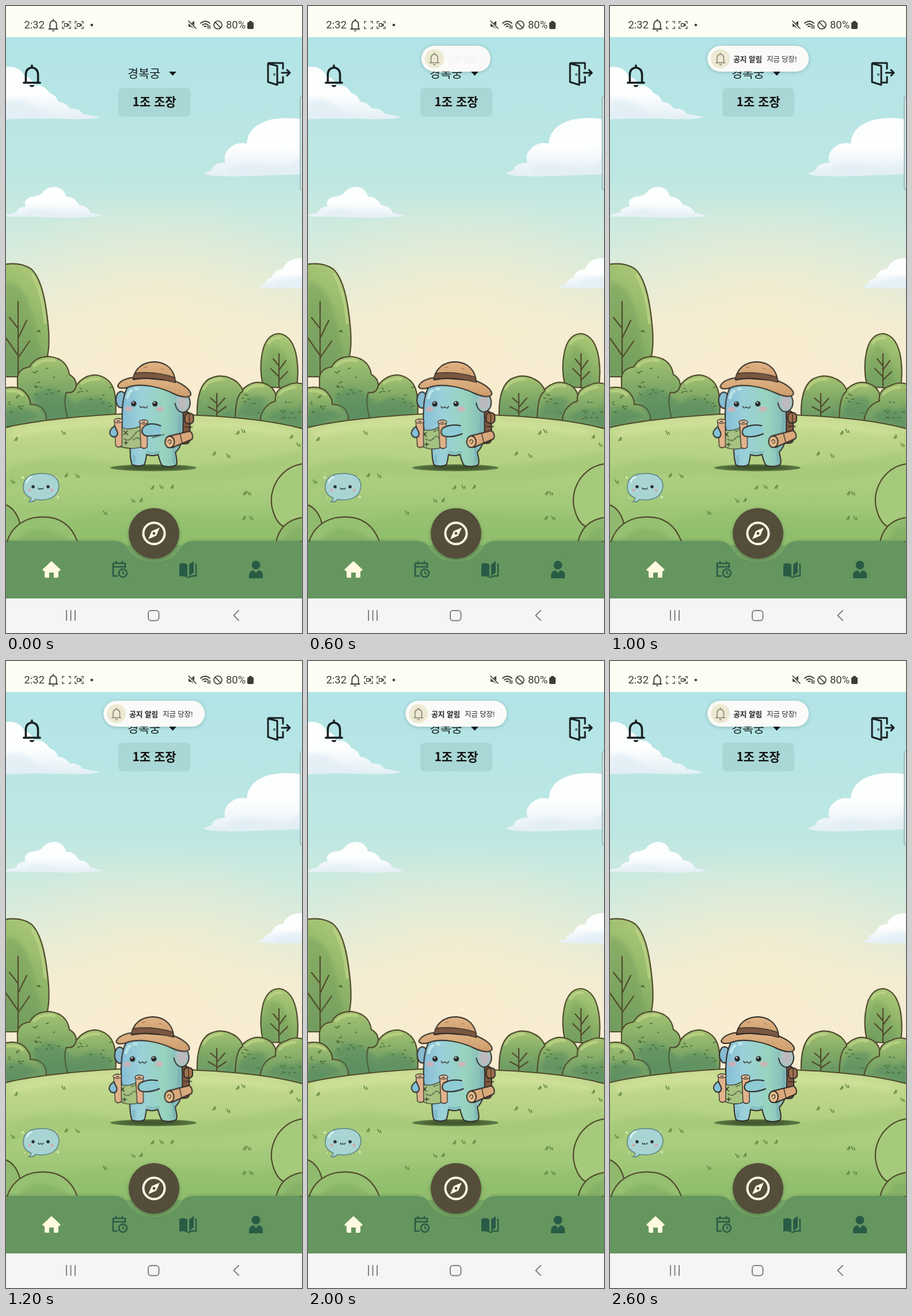
An HTML page for the animation above (2700 ms loop, 514 by 1089 pixels).

```html
<!DOCTYPE html>
<html lang="ko">
<head>
<meta charset="utf-8">
<title>Home</title>
<style>
html, body { margin: 0; width: 100%; height: 100%; overflow: hidden; background: #fdfdf3; }
#stage { position: absolute; left: 0; top: 0; width: 514px; height: 1089px; overflow: hidden; }
svg { display: block; }
text, .toast { font-family: "Noto Sans CJK KR", "Noto Sans CJK", "Noto Sans", sans-serif; }
.status text { font: 18.4px Roboto, sans-serif; fill: #3e3e39; }
.ink, .hero, .line { stroke-linecap: round; stroke-linejoin: round; }
.ink { stroke: #514b2d; stroke-width: 2.2; }
.hero { stroke: #2f2b27; stroke-width: 2; }
.line { fill: none; }
.thin { stroke-width: 1.3; }

.sway, .grip, .wide, .narrow, .blink, .toast, .toast span { animation: 2.7s linear infinite; }
.sway { animation-name: sway; transform-origin: 256px 798px; }
.grip { animation-name: grip; }
.wide { animation-name: wide; animation-timing-function: step-end; }
.narrow { animation-name: narrow; animation-timing-function: step-end; }
.blink { animation-name: blink; animation-timing-function: step-end; }
@keyframes sway {
  0% { transform: rotate(.4deg); }
  11.1% { transform: rotate(0deg); }
  29.6%, 59.2% { transform: rotate(-.7deg); }
  74% { transform: rotate(-.2deg); }
  96.3%, 100% { transform: rotate(0deg); }
}
@keyframes grip {
  0%, 11.1%, 74%, 100% { transform: translateX(0); }
  29.6%, 59.2% { transform: translateX(-3px); }
}
@keyframes wide { 0% { opacity: 1; } 3.7%, 100% { opacity: 0; } }
@keyframes narrow { 0% { opacity: 0; } 3.7%, 100% { opacity: 1; } }
@keyframes blink { 0% { opacity: 1; } 21.5% { opacity: 0; } 69% { opacity: 1; } 91% { opacity: 0; } }

.toast {
  position: absolute; left: 257px; top: 69px; height: 45px; width: 45px; border-radius: 23px;
  overflow: hidden; white-space: nowrap; background: #fafbf8; color: #1c1c1c;
  box-shadow: 0 1px 6px rgba(40, 70, 70, .28); font-size: 12.3px; font-weight: 500; line-height: 45px;
  animation-name: toast;
}
.toast svg { position: absolute; left: 6px; top: 6px; }
.toast span { position: absolute; left: 45px; top: 0; animation-name: words; }
.toast b { font-weight: 700; font-size: 12.6px; margin-right: 8px; }
@keyframes toast {
  0%, 7.4% { opacity: 0; width: 45px; transform: translate(-50%, -18px) scale(.8); }
  11.1% { opacity: .16; width: 45px; transform: translate(-50%, -11.5px) scale(.88); }
  18.5% { opacity: 1; width: 45px; transform: translate(-50%, 0); animation-timing-function: ease-out; }
  27.8%, 100% { opacity: 1; width: 175.5px; transform: translate(-50%, 0); }
}
@keyframes words { 0%, 22% { opacity: 0; } 30% { opacity: .85; } 40%, 100% { opacity: 1; } }
</style>
</head>
<body>
<div id="stage">
<svg width="514" height="1089" viewBox="0 0 514 1089">
<defs>
  <linearGradient id="sky" x2="0" y2="1">
    <stop stop-color="#b2e4e7"/><stop offset=".35" stop-color="#bde7e3"/><stop offset=".55" stop-color="#d7ebdc"/>
    <stop offset=".74" stop-color="#f3ecd3"/><stop offset="1" stop-color="#faecd1"/>
  </linearGradient>
  <radialGradient id="glow"><stop stop-color="#fdeecb" stop-opacity=".6"/><stop offset="1" stop-color="#fdeecb" stop-opacity="0"/></radialGradient>
  <linearGradient id="cloud" x2="0" y2="1"><stop offset=".5" stop-color="#fdfefe"/><stop offset="1" stop-color="#e3eff5"/></linearGradient>
  <linearGradient id="grass" x2="0" y2="1">
    <stop stop-color="#cbdd94"/><stop offset=".25" stop-color="#b9d486"/><stop offset=".65" stop-color="#a4c97a"/><stop offset="1" stop-color="#90bf6e"/>
  </linearGradient>
  <linearGradient id="bush" x2="0" y2="1"><stop stop-color="#a5c373"/><stop offset=".4" stop-color="#83ab67"/><stop offset="1" stop-color="#5f9263"/></linearGradient>
  <linearGradient id="tree" x1=".6" x2=".3" y2="1"><stop stop-color="#aac877"/><stop offset=".5" stop-color="#8fb468"/><stop offset="1" stop-color="#729f61"/></linearGradient>
  <linearGradient id="skin"><stop stop-color="#85bdd6"/><stop offset=".3" stop-color="#9bd0d9"/><stop offset=".7" stop-color="#98d3be"/><stop offset="1" stop-color="#82b8b8"/></linearGradient>
  <linearGradient id="straw" x2="0" y2="1"><stop stop-color="#dfb384"/><stop offset="1" stop-color="#cd9c6c"/></linearGradient>
  <radialGradient id="shade"><stop offset=".45" stop-color="#43582f"/><stop offset="1" stop-color="#5f7b45"/></radialGradient>
  <filter id="soft" x="-30%" y="-30%" width="160%" height="160%"><feGaussianBlur stdDeviation="3"/></filter>
  <g id="bell">
    <path d="M-9 10V-1C-9 -7-6-11 0-12 6-11 9-7 9-1V10M-12 11H12M0-12V-15" class="line"/>
    <path d="M-3.5 14.5A3.5 3 0 0 0 3.5 14.5Z" stroke="none"/>
  </g>
  <path id="corners" class="line" stroke="#44443f" stroke-width="1.4" d="M-7-3V-6H-4M4-6H7V-3M7 3V6H4M-4 6H-7V3"/>
  <path id="cam" class="line" stroke="#44443f" stroke-width="1.3" d="M-3.5-2.5H1.5V2.5H-3.5ZM1.5 0 4-2V2Z"/>
  <g id="scroll" class="hero thin">
    <path d="M-6-22 7-23 7 21Q1 26-4 21Z" fill="#e1b28c"/>
    <ellipse cx=".5" cy="-22.5" rx="7.5" ry="3.5" fill="#f0c9a3"/><path d="M-2-22H3"/>
  </g>
</defs>

<path fill="#fdfdf3" d="M0 0H514V54H0Z"/>
<path fill="url(#sky)" d="M0 54H514V740H0Z"/>
<ellipse cx="262" cy="520" rx="300" ry="200" fill="url(#glow)"/>

<g fill="url(#cloud)">
  <path d="M0 106Q22 103 32 121 46 126 49 138 67 136 75 151 88 155 90 166 103 167 111 178 127 177 133 187L163 193Q150 198 92 196T0 197Z"/>
  <path d="M514 197Q489 192 461 197 420 207 418 239 400 235 388 247 376 257 381 272 359 273 357 285L343 291Q358 298 430 295L514 292Z"/>
  <path d="M0 363 18 358Q20 350 34 348 29 336 45 331 54 331 62 326 70 314 86 314 101 317 104 331 119 331 127 346 142 347 147 359L168 364Q150 369 80 367T0 366Z"/>
  <path d="M514 438Q489 437 481 457 465 458 461 472 451 473 448 483L436 487Q450 492 514 490Z"/>
</g>
<g fill="#dfecf4" opacity=".6" filter="url(#soft)">
  <path d="M0 164Q25 155 48 173T110 191L0 194ZM385 283Q410 265 450 277T514 260V290L390 292ZM28 362Q55 346 80 358T135 362L90 365ZM463 485Q480 470 514 470V488Z"/>
</g>

<!-- left woods -->
<path class="ink" fill="url(#tree)" d="M-4 449Q26 444 44 457C62 474 69 513 73 552Q77 590 71 612L22 644H-4Z"/>
<path fill="#6f9a5a" opacity=".4" filter="url(#soft)" d="M0 480Q29 479 43 526T60 613L22 640H0Z"/>
<path class="ink line" d="M21 513V641M21 560 6 541M21 577 36 546M21 607 0 577M21 611 41 582"/>
<path class="ink" fill="url(#bush)" d="M20 652Q18 630 41 627 51 608 77 609 106 613 110 640 121 646 122 657L125 730H20Z"/>
<path class="ink" fill="url(#bush)" d="M112 730Q97 690 105 671 119 674 122 659 136 640 158 641 182 646 188 669 193 688 189 730Z"/>
<path class="ink" fill="url(#bush)" d="M-4 664Q25 657 37 676 43 684 42 692 66 692 70 713V740H-4Z"/>
<path fill="#477f5d" opacity=".38" filter="url(#soft)" d="M45 680Q70 652 96 671T122 690Q150 668 183 691L184 708 70 718ZM0 700Q25 690 60 712L0 733Z"/>
<path class="line" stroke="#bfd688" stroke-width="5" opacity=".7" d="M49 625Q63 612 84 616M132 655Q145 646 162 648M3 669Q20 667 29 675M46 467Q64 499 68 550"/>

<!-- right woods -->
<path class="ink" fill="url(#tree)" d="M447 661Q438 628 447 594 455 569 475 569 499 573 505 612 509 640 504 665Z"/>
<path fill="#6f9a5a" opacity=".35" filter="url(#soft)" d="M453 656Q446 610 463 590 490 591 494 659Z"/>
<path class="ink line" d="M474 604V662M474 625 464 613M474 632 486 616M474 644 460 630M474 650 489 635"/>
<path class="ink" fill="url(#bush)" d="M398 730Q394 678 414 663 435 646 458 660 469 668 470 684V730Z"/>
<path class="ink" fill="url(#bush)" d="M333 730Q327 665 352 648 377 635 401 653 413 665 410 670 397 678 398 730Z"/>
<path class="ink line" d="M366 673V713M366 690 355 681M366 697 380 681M366 704 351 696M366 707 382 696"/>
<path class="ink" fill="url(#bush)" d="M441 735Q438 696 468 686 465 666 488 659 504 651 518 658V745Z"/>
<path fill="#477f5d" opacity=".35" filter="url(#soft)" d="M405 710Q407 680 435 678T441 713ZM455 716Q468 696 488 700T514 690V729ZM375 711Q400 700 399 678L390 711Z"/>
<path class="line" stroke="#bfd688" stroke-width="5" opacity=".7" d="M343 665Q352 648 375 648M417 668Q431 656 446 660M475 674Q484 664 502 662M456 586Q463 575 477 576"/>
<g id="leaves" class="line" stroke="#4b6b36" stroke-width="1.5"></g>

<!-- meadow -->
<path class="ink" fill="url(#grass)" d="M-4 733Q60 717 190 709 260 705 335 711 450 716 518 735V940H-4Z"/>
<g fill="#83b760" opacity=".2" filter="url(#soft)">
  <path d="M0 803Q90 767 205 798L309 801Q430 793 514 770V803Q380 835 235 819T0 837ZM80 900Q180 858 310 877T514 870V928H90Z"/>
</g>
<path fill="#dbe6a4" opacity=".4" filter="url(#soft)" d="M10 736Q100 717 190 717V730Q90 734 10 751ZM325 720Q420 720 500 740L480 747Q400 734 325 736Z"/>
<g id="tufts" class="line" stroke="#587c3b" stroke-width="1.5"></g>
<path class="ink" fill="#a6ca7b" d="M518 795Q490 797 472 822 453 852 466 884 474 904 490 907L518 900Z"/>
<path class="ink" fill="#90ba6d" d="M469 930Q478 892 518 888V930ZM-4 865Q19 872 25 903L20 930H-4Z"/>
<path class="ink" fill="#96c072" d="M2 930Q12 898 47 889 105 879 124 930Z"/>
<path fill="#70a259" opacity=".35" filter="url(#soft)" d="M20 929Q40 903 70 909T108 929ZM484 928Q492 905 514 905V928Z"/>

<!-- traveller -->
<ellipse cx="256" cy="802" rx="75" ry="6" fill="url(#shade)"/>
<g class="sway">
  <g class="hero">
    <rect x="299" y="704" width="20" height="56" rx="7" fill="#80573f"/>
    <rect x="310" y="707" width="15" height="18" rx="6" fill="#a06f4d"/>
    <path class="thin" d="M318 708V724M310 731H323"/>
    <ellipse cx="199" cy="684" rx="9" ry="14" fill="#86bbd0"/>
    <path fill="url(#skin)" d="M215 768C203 750 200 735 201 715 201 690 203 668 218 650H292C306 668 308 700 307 735 307 755 302 768 294 775 296 785 299 795 294 798Q282 802 271 798C267 792 266 786 264 779Q254 783 244 779C243 787 242 793 240 797Q230 801 219 797C215 788 216 778 215 768Z"/>
    <path fill="#a3c4c4" d="M297 676Q306 668 315 676 322 687 317 698 310 709 301 704 294 699 293 690"/>
  </g>
  <ellipse cx="307" cy="689" rx="8" ry="12" fill="#c6b6bc" opacity=".7"/>
  <path class="line" stroke="#6ba2ae" stroke-width="5" opacity=".4" d="M302 712Q303 745 291 767L292 792M222 782V792M246 775Q255 779 265 775"/>
  <path class="line" stroke="#c6ebea" stroke-width="5" opacity=".8" d="M210 680Q212 671 217 668M224 665H228"/>
  <g fill="#d8adb2" opacity=".75"><ellipse cx="212" cy="700" rx="7" ry="4.5"/><ellipse cx="267" cy="700" rx="7" ry="4.5"/></g>
  <g fill="#282828"><circle cx="221" cy="691" r="4.7"/><circle cx="258" cy="691" r="4.7"/></g>
  <g fill="#fff"><circle cx="220" cy="689" r="1.3"/><circle cx="257" cy="689" r="1.3"/></g>
  <path class="hero line thin" d="M232 695Q233 700 238 696 243 701 245 695"/>
  <g class="hero">
    <path fill="url(#straw)" d="M193 660C197 650 211 646 222 645L292 651C308 657 321 667 320 675 316 681 303 679 290 673 268 662 236 655 215 661 205 665 194 666 193 660Z"/>
    <path fill="url(#straw)" d="M220 649C222 629 237 618 258 618 279 619 292 633 293 653Q256 643 220 649Z"/>
    <path class="thin" fill="#7a5741" d="M222 638Q257 633 292 645L293 654Q255 643 219 648Z"/>
    <path class="line thin" stroke="#a87a52" d="M239 628 244 627M268 629 272 631"/>
  </g>

  <g class="wide">
    <path class="hero thin" fill="#a9bf83" d="M199 733Q216 738 235 729L240 764Q222 772 199 766Z"/>
    <path class="line" stroke="#41583a" stroke-width="1.6" stroke-dasharray="4 2" d="M205 752Q213 758 220 748T231 738M221 754Q226 748 232 752"/>
    <path class="line" stroke="#33402b" stroke-width="1.6" d="M204 738 211 745M211 738 204 745M205 759H211M208 756V762"/>
    <use href="#scroll" x="194" y="743"/>
    <use href="#scroll" x="238" y="745"/>
    <path class="hero" fill="#8ac6d4" d="M268 729Q246 721 237 733 233 743 243 747 256 747 268 745"/>
    <path class="line" stroke="#537c7d" stroke-width="2" d="M254 750 274 744"/>
  </g>
  <g class="narrow">
    <path class="hero thin" fill="#a6c281" d="M198 735Q215 740 230 730L233 766Q218 773 199 765Z"/>
    <path class="line" stroke="#41583a" stroke-width="1.5" stroke-dasharray="4 2" d="M205 752Q213 757 219 750T229 752M219 739 226 736"/>
    <path class="line" stroke="#33402b" stroke-width="1.6" d="M200 740 206 747M206 740 200 747M203 761H210M206 758V764"/>
    <use href="#scroll" x="194" y="743"/>
    <g class="grip">
      <use href="#scroll" x="235" y="745"/>
      <path class="hero" fill="#8dcbd5" d="M267 729Q251 725 236 733 230 742 238 747 254 750 270 743"/>
    </g>
  </g>
  <path class="hero" fill="#83c1d8" d="M188 730Q179 736 180 743 183 751 191 748 195 744 192 738Z"/>
  <g class="hero">
    <path fill="#d9a97c" d="M282 747 319 738Q326 744 323 752L288 767Z"/>
    <ellipse cx="284" cy="757" rx="8" ry="10" fill="#e9bd8e"/>
    <path class="line thin" d="M281 757Q281 752 286 754 288 760 283 760M302 743 306 760"/>
  </g>
</g>

<!-- chat bubble -->
<g>
  <path fill="#a8d5d4" stroke="#5b8084" stroke-width="1.5" d="M37 819Q44 812 62 812 91 812 92 834 90 857 61 858L51 857Q48 862 40 861 45 857 43 854 30 849 30 835 30 825 37 819Z"/>
  <path class="line" stroke="#d9f1ee" stroke-width="3" d="M36 827Q38 820 44 818"/>
  <g fill="#d3a9ae"><circle cx="41" cy="841" r="2.5"/><circle cx="80" cy="841" r="2.5"/></g>
  <g fill="#263033"><circle cx="47" cy="835" r="2.8"/><circle cx="73" cy="835" r="2.8"/></g>
  <path class="line" stroke="#263033" stroke-width="1.3" d="M56 837Q57 841 60 838 63 841 65 837"/>
  <path class="line" stroke="#f0f7d6" stroke-width="1.2" d="M29 817V821M27 819H31M90 851V855M88 853H92M33 853V855M87 817V819"/>
</g>

<!-- tab bar -->
<path fill="#426b3b" opacity=".3" filter="url(#soft)" d="M0 928H185Q203 928 211 940H303Q311 928 329 928H514V940H0Z"/>
<path fill="#65965f" d="M0 934Q0 929 8 929H185Q203 929 210 940H304Q311 929 329 929H506Q514 929 514 934V1029H0Z"/>
<path fill="#78a868" d="M207 936Q224 966 257 966T307 936Z"/>
<circle cx="257" cy="919" r="44" fill="#2f4525" opacity=".4" filter="url(#soft)"/>
<circle cx="257" cy="916" r="44" fill="#544d3a"/>
<circle cx="257" cy="916" r="18.500" fill="none" stroke="#fcf8e6" stroke-width="4"/>
<path fill="#fcf8e6" d="M267 906 261 920 247 926 253 912Z"/>
<circle cx="257" cy="916" r="2.400" fill="#544d3a"/>
<path fill="#fff9df" d="M79 964 95 979 92 982 91 981V991Q91 993 89 993H83V984H75V993H69Q67 993 67 991V981L66 982 63 979Z"/>
<g fill="none" stroke="#285b45" stroke-width="2.6" stroke-linejoin="round">
  <path d="M194 990H186V968H207V976M186 974H207M191 964V969M202 964V969"/>
  <circle cx="203" cy="985" r="7"/><path d="M203 981V985L206 987" stroke-width="2"/>
</g>
<path fill="#285b45" d="M301 969Q309 966 315 970V993Q309 989 301 991ZM318 970 326 964V984L318 990Z"/>
<path fill="none" stroke="#285b45" stroke-width="2.4" d="M328 970H330V990Q322 989 316 993"/>
<g fill="#285b45"><circle cx="434" cy="971" r="7.5"/><path d="M422 994V988Q423 981 430 980L434 985 438 980Q446 981 446 988V994Z"/></g>

<path fill="#f5f5f5" d="M0 1029H514V1089H0Z"/>
<g class="line" stroke="#828282" stroke-width="2">
  <path d="M105 1050V1067M112.500 1050V1067M120 1050V1067M404 1050 395.500 1058.500 404 1067"/>
  <rect x="247" y="1050" width="18.500" height="17.500" rx="5"/>
</g>

<!-- header -->
<g class="status">
  <text x="31.500" y="39">2:32</text><text x="382" y="39">80%</text>
  <use href="#bell" transform="translate(82 33) scale(.63)" stroke="#3e3e39" stroke-width="3" fill="#3e3e39"/>
  <use href="#corners" x="105" y="33"/><use href="#corners" x="127" y="33"/>
  <use href="#cam" class="blink" x="105" y="33"/><use href="#cam" x="127" y="33"/>
  <circle cx="149" cy="33" r="2.300" fill="#3e3e39"/>
  <path fill="#3e3e39" d="M317 30H321L327 26V40L321 36H317Z"/>
  <path class="line" stroke="#fdfdf3" stroke-width="4" d="M317 27 330 40"/>
  <g class="line" stroke="#3e3e39" stroke-width="1.700">
    <path d="M317 26 330 39M338 30Q346 23 354 30M341 33Q346 29 351 33M344 36Q346 34 348 36M351 39V34M354 34V39"/>
    <circle cx="368" cy="33" r="7"/><path d="M363 28 373 38"/>
  </g>
  <path fill="#3e3e39" d="M422 26H427V28H428Q430 28 430 30V38Q430 40 428 40H421Q419 40 419 38V30Q419 28 421 28H422Z"/>
</g>
<use href="#bell" transform="translate(45 120.500) scale(1.18 1.15)" fill="#172022" stroke="#172022" stroke-width="3"/>
<g class="line" stroke="#172022" stroke-width="3">
  <path d="M455 100 471 104V137L455 132ZM456 99H481V109M481 123V133H472M479 116H492M488 111 493 116 488 121"/>
  <circle cx="466" cy="119" r=".5"/>
</g>
<text x="211" y="124.500" font-size="20.700" fill="#182020">경복궁</text>
<path fill="#101818" d="M283 114H296L289.500 121Z"/>
<rect x="195" y="142" width="125" height="50" rx="8" fill="#a9d7d5"/>
<text x="257.500" y="174" font-size="21" font-weight="700" text-anchor="middle" fill="#111">1조 조장</text>
<rect x="511" y="157" width="10" height="163" rx="4" fill="#d4e9e9" stroke="#819b9d" stroke-width="1.200"/>
</svg>

<div class="toast">
  <svg width="33" height="33" viewBox="-16.5 -16.5 33 33">
    <circle r="16.500" fill="#ede9d2"/>
    <use href="#bell" transform="scale(.65)" stroke="#8b8879" stroke-width="2.600" fill="#8b8879"/>
  </svg>
  <span><b>공지 알림</b>지금 당장!</span>
</div>
</div>
<script>
let seed = 17;
const rand = () => (seed = seed * 16807 % 2147483647) / 2147483647;

function strokes(id, d) {
  const p = document.createElementNS("http://www.w3.org/2000/svg", "path");
  p.setAttribute("d", d);
  document.getElementById(id).append(p);
}

// Leaf marks: centre x, y, spread x, y, count
const patches = [[75, 650, 28, 27, 14], [152, 680, 28, 22, 11], [20, 692, 18, 16, 9],
  [428, 690, 20, 18, 7], [492, 696, 18, 22, 11], [54, 566, 3, 2, 3]];
for (const [x, y, w, h, n] of patches) {
  for (let i = 0; i < n; i++) {
    const px = x + (rand() * 2 - 1) * w, py = y + (rand() * 2 - 1) * h;
    strokes("leaves", `M${px} ${py}l${2 + rand() * 3} ${rand() * 5 - 2}`);
  }
}

const tufts = [[12, 826], [102, 815], [124, 816], [15, 752], [100, 741], [252, 836], [270, 835], [286, 835],
  [221, 859], [232, 858], [172, 880], [412, 846], [422, 846], [411, 889], [426, 889],
  [359, 777], [386, 781], [400, 741], [412, 738], [493, 748], [508, 762]];
tufts.forEach(([x, y], i) => {
  const lean = i % 2 ? 4 : -3;
  strokes("tufts", `M${x} ${y + 3}l${lean} -6M${x + 3} ${y + 3}l${lean / 2} -4`);
});
</script>
</body>
</html>
```
